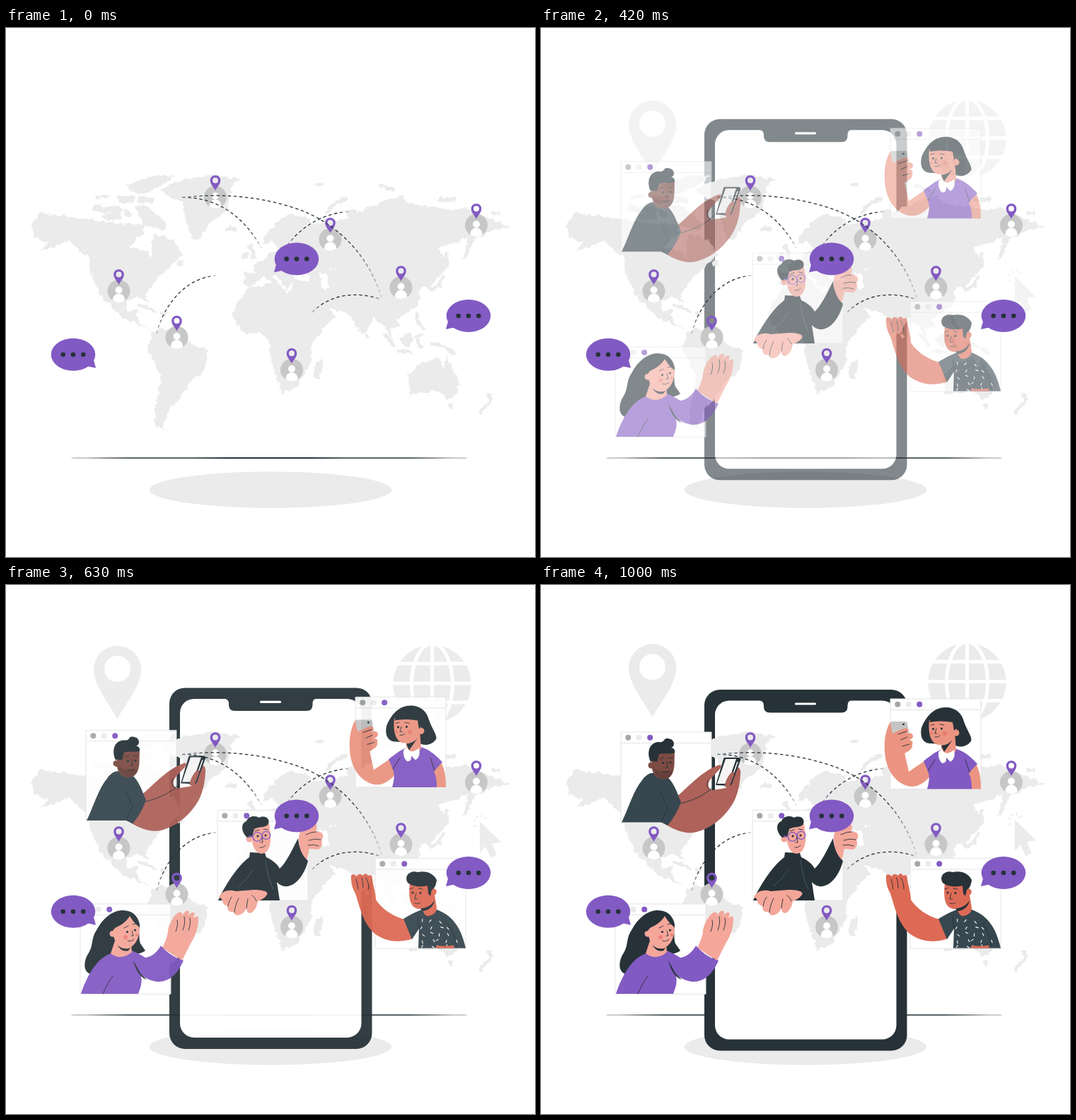
These frames come from a looping animation (748x748 px, 1040 ms). An HTML page:

```html
<!DOCTYPE html>
<html lang="en">
<head>
<meta charset="utf-8">
<title>Video call around the world</title>
<style>
html, body { margin: 0; width: 100%; height: 100%; overflow: hidden; background: #fff; }
svg { display: block; width: 100%; height: 100%; }
.land { fill: #ebebeb; }
.isles { fill: none; stroke: #ebebeb; stroke-linecap: round; stroke-linejoin: round; }
.purple { fill: #825ac3; }
.dark { fill: #263238; }
.shirt { fill: #37474f; }
.white { fill: #fff; }
.rose { fill: #f4a699; }
.peach { fill: #eb9481; }
.coral { fill: #dd6a55; }
.brown { fill: #7c4b43; }
.arm { fill: #ae625a; }
.ink { fill: none; stroke: #263238; stroke-width: .9; stroke-linecap: round; }
.eyes { fill: none; stroke: #263238; stroke-width: 3.2; stroke-linecap: round; }
.gap { fill: none; stroke: #fff; stroke-width: 5; }
.arc { fill: none; stroke: url(#fade); stroke-width: 1.3; stroke-dasharray: 4.5 3.6; }
</style>
</head>
<body>
<svg viewBox="0 0 748 748">
  <defs>
    <linearGradient id="fade">
      <stop offset="0" stop-color="#263238" stop-opacity=".3"/>
      <stop offset=".12" stop-color="#263238"/>
      <stop offset=".85" stop-color="#263238"/>
      <stop offset="1" stop-color="#263238" stop-opacity=".2"/>
    </linearGradient>
    <filter id="coast" color-interpolation-filters="sRGB" filterUnits="userSpaceOnUse" x="0" y="180" width="748" height="420">
      <feTurbulence type="fractalNoise" baseFrequency=".14" numOctaves="2" seed="4"/>
      <feDisplacementMap in="SourceGraphic" scale="8" xChannelSelector="R" yChannelSelector="G"/>
    </filter>
  </defs>

  <ellipse class="land" cx="374" cy="653" rx="171.3" ry="25.7"/>
  <ellipse class="dark" cx="372" cy="608" rx="281" ry=".9"/>

  <g data-shift="1">
    <path class="land" fill-rule="evenodd" d="M157.5 187C150 171 124 141 124 117a33.7 33.7 0 0 1 67.4 0C191.4 141 165 171 157.5 187zM139 116a18.5 18.5 0 0 0 37 0a18.5 18.5 0 0 0-37 0z"/>
    <circle class="land" cx="602.5" cy="137.5" r="55.2"/>
    <path class="gap" d="M602.5 80v115M545 108.5h115M545 136.5h115M545 163.5h115"/>
    <ellipse class="gap" cx="602.5" cy="137.5" rx="29" ry="57"/>
    <path class="land" d="M670 332L700 361L687 363L693.5 379L685 383L678 367L670 376z"/>
    <path d="M665 337l-4 2M664 331l-4-1M667 327l-3-4M672 326l1-4M676 329l4-3" fill="none" stroke="#ebebeb" stroke-width="1.7"/>
  </g>

  <g data-shift="-1">
    <rect class="dark" x="231" y="148" width="286.5" height="510.5" rx="22"/>
    <rect class="white" x="246" y="163.5" width="256.5" height="479" rx="20"/>
    <path class="dark" d="M308 163h131q-5.5 1-5.5 7v2q0 8.5-8.5 8.5h-101.5q-8.5 0-8.500-8.5v-2q0-6-7-7z"/>
    <path d="M360.5 168h27" stroke="#fff" stroke-width="3.2" stroke-linecap="round"/>
  </g>

  <g class="land" filter="url(#coast)">
    <g id="north-america">
      <path d="M37 277L48 262L113 269L150 276L196 278L190 290L176 309L200 317L205 326L208 291L236 299L251 321L229 339L214 354L198 376L201 390L185 379L170 386L172 402L187 397L184 407L193 420L206 430L188 419L162 408L133 376L119 345L116 322L88 301L48 316L59 304L40 296z"/>
      <path d="M131 374L137 378L146 393z"/>
      <path d="M182 253L196 250L216 266L227 277L222 287L206 281L196 280z"/>
      <path d="M168 222L215 208L239 210L202 233L186 234z"/>
      <path class="isles" stroke-width="9" d="M140 257h21M142 267l17-1M126 254l6 1M162 243l15-1M192 243h13M171 261l3 2M186 290h3M246 332h1"/>
      <path class="isles" stroke-width="4" d="M128 240l16-2M188 393l11 1l12 7M220 404h6"/>
    </g>
    <path d="M216 230L240 217L290 207L330 214L319 224L313 256L286 278L272 300L264 298L253 268L250 246L235 240z"/>
    <path class="isles" stroke-width="7" d="M312 284h11M346 309l5 15M337 323l2-2"/>
    <path d="M206 431L222 424L247 435L268 450L286 456L277 490L263 497L245 525L232 538L222 565L231 571L212 564L210 550L219 489L199 455z"/>
    <g id="africa">
      <path d="M342 368L384 360L398 374L404 371L422 375L442 416L450 418L446 430L432 446L430 475L412 506L390 517L376 474L371 440L362 432L336 432L320 408L323 395z"/>
      <path d="M435 480L446 467L448 476L442 495L436 496z"/>
    </g>
    <g id="europe">
      <path d="M337 361L337 346L352 346L348 336L370 326L370 317L392 313L445 300L460 350L422 388L405 372L405 360L397 371L382 350L376 350L387 362L380 366L366 351L344 367z"/>
      <path d="M392 315L376 302L364 307L366 292L390 268L404 262L432 271L428 280L470 271L484 269L482 258L495 256L500 340L445 340z"/>
    </g>
    <g id="asia">
      <path d="M420 360L490 330L584 340L586 372L583 392L553 412L558 423L543 425L546 444L534 420L520 410L506 434L499 428L484 404L457 396L466 408L440 432L422 388z"/>
      <path d="M480 335L490 264L540 242L560 237L568 248L625 257L650 255L712 281L690 285L662 299L653 322L647 326L654 294L640 302L610 310L626 336L604 360L598 372L592 366L570 368z"/>
      <path class="isles" stroke-width="5" d="M622 318l1 18M600 370l12-5l6-14M581 405l2 10l6 10M510 434l1 3"/>
    </g>
    <path class="isles" stroke-width="5" d="M454 260l10-11l16-8M440 222l7-1M530 223l18 6M614 243h20M690 262h6"/>
    <g id="oceania">
      <path class="isles" stroke-width="5" d="M535 433l14 17M555 457l18 2M588 434l-8 3l6 14M602 446l16 4l16 10"/>
      <path d="M558 438L570 430L576 436L571 450L560 449z"/>
      <path d="M567 490L590 473L612 467L620 482L622 462L642 503L637 518L626 525L608 513L572 518z"/>
      <path class="isles" stroke-width="5" d="M629 533v2M682 519l4 6l-3 5M670 543l9-9"/>
    </g>
    <path class="white" d="M405 347L418 344L432 352L428 358L410 356zM443 346L452 346L457 368L450 371z"/>
  </g>

  <g id="people"></g>
  <g>
    <path class="arc" d="M249 239.5C299 239 337 267 361 311"/>
    <path class="arc" d="M249 239.5C300 234 350 237 400 252C470 272 514 325 531 381"/>
    <path class="arc" d="M213 432C222 396 250 354 297 350"/>
    <path class="arc" d="M398 307C415 284 445 262 485 259.5"/>
    <path class="arc" d="M433 402C457 377 495 371 531 384"/>
  </g>

  <g data-shift="-1" data-window="113 208">
    <path class="brown" d="M158 252L160 270Q170 281 178 274L184 262z"/>
    <path class="arm" d="M184 305C204 292 222 266 250 255C256 253 256 257 252 261L240 274C233 283 238 290 243 290L262 287C269 281 274 266 276 260C279 255 283 260 282 268C281 285 277 300 270 311C258 330 238 346 216 350C204 352 190 347 177 339z"/>
    <path class="shirt" d="M114 335.5C124 315 131 290 143 276C149 267 156 265 160 266Q168 276 178 271C187 278 192 292 198 307Q191 326 179 340L170 335.5z"/>
    <path class="brown" d="M157 240V260C159 270 166 275 174 274.5C184 274 188 265 188.5 254L189 234L165 230z"/>
    <circle class="brown" cx="156" cy="255" r="4.5"/>
    <path d="M159 260Q170 266 187 262Q184 274 174 274.5Q163 274 159 260z" fill="#67403b"/>
    <path class="dark" d="M155 250C149 237 153 223 166 222Q173 223 175 218C178 216 187 217 188 224Q188 229 184 230Q190 231 189 237C182 240 174 237 167 239L164 250L159 249z"/>
    <path class="eyes" d="M172.5 251.5h.01M183 251h.01"/>
    <path class="ink" d="M168 246l6-2M180 244l6 1M178 250l1 8h-3M172 264q5 2 9-1M169 293L179 316L170 335M198 309Q231 300 245 284M236 276Q232 286 240 290"/>
    <path class="dark" d="M260 244H279Q283 244 282 248L270 281Q269 284 266 284L247 283L258 246Q258 244 260 244z"/>
    <path d="M261 246H276L264 281H249z" fill="#f5f5f5"/>
    <path d="M278 250L267 281" stroke="#fff" stroke-width="1.5"/>
    <path class="arm" d="M260 285C260 276 268 264 272 264C275 265 272 272 269 277L266 288z"/>
  </g>

  <g data-shift="-1" data-window="494 161">
    <path class="peach" d="M545 247L551 269C541 283 527 288 515 283C497 276 487 257 486 235C485 220 487 207 493 195C497 191 500 196 498 207L512 228L520 264z"/>
    <path d="M494 195Q494 193 497 193H515Q518 193 518 196L521 214L506 222L497 210z" fill="#c5c5c5"/>
    <path class="dark" d="M511 196h3v2h-3z"/>
    <path class="peach" d="M497 210C505 207 513 201 518 203Q522 205 517 210Q526 208 526 214Q526 218 520 219Q527 220 525 225C526 232 520 235 512 239L499 250L488 232z"/>
    <path class="dark" d="M572 173C586 173 595 181 598 193C602 205 609 213 608.5 220C602 230 590 230 584 226L550 224C538 223 536 212 538 202C545 184 557 173 572 173z"/>
    <path class="peach" d="M605 264L615 253C621 264 622 276 622 288.5H607z"/>
    <path class="purple" d="M546 288.5C550 275 549 269 547 263L541 249C551 241 559 235 566 233L588 232C600 236 610 245 617 253L605 266C609 274 609 282 609 288.5z"/>
    <path class="peach" d="M566 215L585 207L587 234Q581 244 571 242L566 232z"/>
    <path class="white" d="M562 236L567 232Q572 243 584 233Q587 245 579 250Q575 246 573 244Q574 252 567 252Q561 246 562 236z"/>
    <path class="dark" d="M566 227Q576 226 582 219L570 236z"/>
    <path class="peach" d="M549 191C547 207 550 224 562 226C575 226 585 217 587 207L588 190z"/>
    <circle class="peach" cx="587" cy="209" r="4.5"/>
    <path class="dark" d="M549 194C554 184 560 176 570 175C582 175 589 184 590 200L584 206L582 194Q565 191 549 194z"/>
    <path class="eyes" d="M554.5 203.5h.01M566.5 203h.01"/>
    <path class="ink" d="M551 198l5-1M564 197l6 1M559 203l-2 7h3M557 215q4 1 7-2M600 247L606 265M547 263L557 247M505 211l12-4M509 219l9-4M511 228l10-3"/>
    <g fill="#e47b6c"><circle cx="571" cy="210" r="3"/><circle cx="552" cy="210" r="2"/></g>
  </g>

  <g data-shift="0" data-window="299 318.5">
    <path class="rose" d="M414 361C413 349 420 338 428 337H437Q442 341 438 348L446 350Q451 355 446 361C449 366 445 374 440 374L429 373L425 390L417 388z"/>
    <path class="dark" d="M300 446C312 420 330 395 344 385L345 378L366 379L368 385C377 389 384 395 387 401C396 393 405 374 413 358Q415 380 427 390C423 407 412 424 398 426Q389 427 383 420L387 446z"/>
    <path class="rose" d="M348 348C346 364 350 378 361 380C372 379 375 366 374 352L372 338L352 338z"/>
    <circle class="rose" cx="344" cy="359" r="4.5"/>
    <path class="dark" d="M341 357C333 350 331 337 340 334C342 327 352 325 358 329C366 325 374 330 371 338C367 344 358 341 351 345L348 356z"/>
    <path class="eyes" d="M356 355h.01M367 354h.01"/>
    <g fill="none" stroke="#825ac3" stroke-width="1.3"><circle cx="355.5" cy="356" r="6.3"/><circle cx="368" cy="354" r="5.6"/><path d="M349 356l-6-1"/></g>
    <path class="ink" d="M352 348l6-2M364 345l6 1M362 356l1 8h-3M359 371q5 1 8-3M424 353q8-4 15-4M428 361q9-3 17-1M427 368q8-2 15 1"/>
    <path d="M367 389Q371 418 378 430M329 426Q341 416 350 402" fill="none" stroke="#52606a" stroke-width=".8"/>
    <path class="rose" d="M301 441C305 433 315 430 325 433L350 431C362 431 372 433 369 438Q365 444 356 447C355 456 350 463 345 464Q340 464 340 456C338 463 332 467 327 467Q323 467 322 462Q313 464 313 454Q306 452 305 444z"/>
    <path class="ink" d="M314 454Q315 446 319 441M323 463Q324 452 329 443M340 457Q341 449 342 444M354 447Q352 441 348 439"/>
  </g>

  <g data-shift="0" data-window="105 451">
    <path class="dark" d="M163 460C178 459 187 468 189 480C188 492 188 502 190 507L197 517C186 526 165 520 160 518Q149 516 145 530C140 545 130 552 119 550C108 546 110 530 117 520C124 508 120 500 128 488C137 471 150 461 163 460z"/>
    <path class="rose" d="M221 513C226 503 229 495 229 488C231 478 238 466 244 463Q250 461 249 468C252 461 258 458 259 463L257 468Q263 461 267 464L265 471Q272 465 272 472C272 488 266 499 261 507L249 531z"/>
    <path class="purple" d="M106 578C112 560 125 530 146 522L156 517C163 528 172 525 178 517C186 520 192 524 197 527C206 526 214 519 219 510Q233 526 251 531C243 549 232 561 215 561C204 560 196 555 190 550C194 561 190 570 187 578z"/>
    <path class="rose" d="M155 500L148 521Q163 532 178 519L177 508z"/>
    <path class="dark" d="M157 508Q165 517 176 513L173 517Q163 520 157 508z"/>
    <path class="rose" d="M151 484C151 504 158 514 170 514C182 512 188 501 189 486L181 468L164 465z"/>
    <circle class="rose" cx="151" cy="493" r="4.5"/>
    <path class="dark" d="M146 490C148 474 155 463 166 462C180 461 188 470 189 484C183 480 178 473 175 468C169 478 160 482 154 485L151 489z"/>
    <path class="eyes" d="M171.5 490.5h.01M182.5 488h.01"/>
    <path class="ink" d="M167 485l6-3M179 480l5-1M178 489l2 7h-3M172 503q5 2 9-2M137 578Q144 562 151 553M240 490q4-10 2-16M250 488q4-10 2-19M258 488q4-9 2-17"/>
    <path class="dark" d="M180 531L190 549L199 558Q186 554 180 531z"/>
    <g fill="#ec8277"><circle cx="169" cy="498" r="3"/><circle cx="185" cy="495" r="2"/></g>
  </g>

  <g data-shift="0" data-window="522 386.5">
    <path class="coral" d="M488 414C487 408 492 408 496 412Q499 406 505 411Q508 405 512 411Q518 408 518 416C520 428 523 437 523 445C531 457 545 468 564 473L575 500C555 507 535 504 520 492C505 478 500 455 494 436C489 428 488 420 488 414z"/>
    <path class="shirt" d="M562 472C575 464 585 460 590 458L609 459C630 467 643 482 650 513.5H583L584 486L574 501z"/>
    <path class="coral" d="M585 446L589 459Q592 471 601 467Q609 464 609 457L606 438z"/>
    <path class="dark" d="M585 457Q598 458 606 446Q603 459 590 461z"/>
    <path class="coral" d="M571 422C569 440 570 456 583 458C597 457 605 449 606 438L604 422z"/>
    <circle class="coral" cx="604" cy="434" r="4.8"/>
    <path class="dark" d="M568 421C562 411 572 403 582 406C594 403 605 408 609 417C608 425 606 429 602 431L600 440L597 436L596 425C585 428 574 426 568 421z"/>
    <path class="eyes" d="M575 435h.01M586 435.5h.01"/>
    <path class="ink" d="M571 430l5-2M583 429l6 1M580 436l-2 8h4M578 450q5 2 8-1M498 430q-1-8-3-14M505 428q0-8-2-14M513 430q0-9-4-16M584 486L582 469"/>
    <path id="specks" fill="none" stroke="#fff" stroke-width="1.1"/>
    <path class="coral" d="M607 513.5L609 510Q622 511 633 509.5L634 513.5z"/>
    <path class="ink" d="M624 478Q635 494 637 510"/>
  </g>

  <g id="bubbles"></g>
</svg>
<script>
const LOOP = 1040, FPS = 24, TRAVEL = 44.9;
const $ = id => document.getElementById(id);

const avatar = ([x, y]) => `<g transform="translate(${x} ${y})">
  <circle r="16" fill="#c7c7c7"/><circle class="white" cy="-1.5" r="5"/>
  <path class="white" d="M-8.5 13.5V12a8.5 8.5 0 0 1 17 0V13.5A16 16 0 0 1-8.5 13.5z"/>
  <path class="purple" fill-rule="evenodd" d="M0-9C-2-14-7.3-18-7.3-23.5a7.3 7.3 0 0 1 14.6 0C7.3-18 2-14 0-9zM-4-23.5a4 4 0 0 0 8 0a4 4 0 0 0-8 0z"/></g>`;
$('people').innerHTML = [[296, 239], [159.5, 372], [241.5, 437.5], [404, 483.5], [458.5, 299], [558.5, 367], [665, 279]].map(avatar).join('');

// side: 1 puts the tail on the right, -1 on the left
const bubble = ([x, y, side]) => `<g transform="translate(${x} ${y}) scale(${side} 1)">
  <ellipse class="purple" rx="31.3" ry="23"/><path class="purple" d="M29 8L32 19L18 16z"/>
  ${[-14.3, 0, 14.3].map(dx => `<circle class="dark" cx="${dx}" r="3.3"/>`).join('')}</g>`;
$('bubbles').innerHTML = [[95, 461.8, 1], [411, 326.6, -1], [654, 407, -1]].map(bubble).join('');

// Confetti print: a jittered grid of short strokes, kept inside the shirt
const noise = n => Math.abs(Math.sin(n * 127.1) * 43758.5) % 1;
let specks = '';
for (let i = 0; i < 24; i++) {
  const y = 472 + Math.floor(i / 5) * 9 + noise(i) * 4;
  const x = 588 + (i % 5) * 11 + noise(i + 50) * 5;
  if (x > 618 + (y - 470) * .65) continue;
  const turn = noise(i + 90) * Math.PI;
  specks += `M${x} ${y}l${4.5 * Math.cos(turn)} ${4.5 * Math.sin(turn)}`;
}
$('specks').setAttribute('d', specks);

for (const pane of document.querySelectorAll('[data-window]')) {
  const [x, y] = pane.dataset.window.split(' ');
  pane.insertAdjacentHTML('afterbegin', `<g transform="translate(${x} ${y})">
    <path d="M0 0H128V127.5H0zM0 15.5H128" fill="#fff" stroke="#e4e4e4"/>
    <circle cx="10.3" cy="7.8" r="4" fill="#a6a6a6"/><circle class="land" cx="25.6" cy="7.8" r="4"/>
    <circle class="purple" cx="41.2" cy="7.8" r="4"/></g>`);
}

const cubic = (a, b, s) => 3 * a * s * (1 - s) ** 2 + 3 * b * s * s * (1 - s) + s ** 3;

// cubic-bezier(.36, -.01, .5, 1.38)
function ease(x) {
  let low = 0, high = 1;
  for (let i = 0; i < 24; i++) {
    const mid = (low + high) / 2;
    if (cubic(.36, .5, mid) < x) low = mid; else high = mid;
  }
  return cubic(-.01, 1.38, high);
}

const movers = [...document.querySelectorAll('[data-shift]')];
let shown = -1;

function render(time) {
  const step = Math.min(FPS, Math.floor((time % LOOP + 4) * FPS / 1000));
  if (step === shown) return;
  shown = step;
  const p = step < 2 ? 0 : ease(step / FPS);
  for (const el of movers) {
    el.setAttribute('opacity', Math.min(1, Math.max(0, p)));
    el.setAttribute('transform', `translate(0 ${el.dataset.shift * TRAVEL * (1 - p)})`);
  }
}

function tick() {
  render(performance.now());
  requestAnimationFrame(tick);
}
tick();
</script>
</body>
</html>
```
